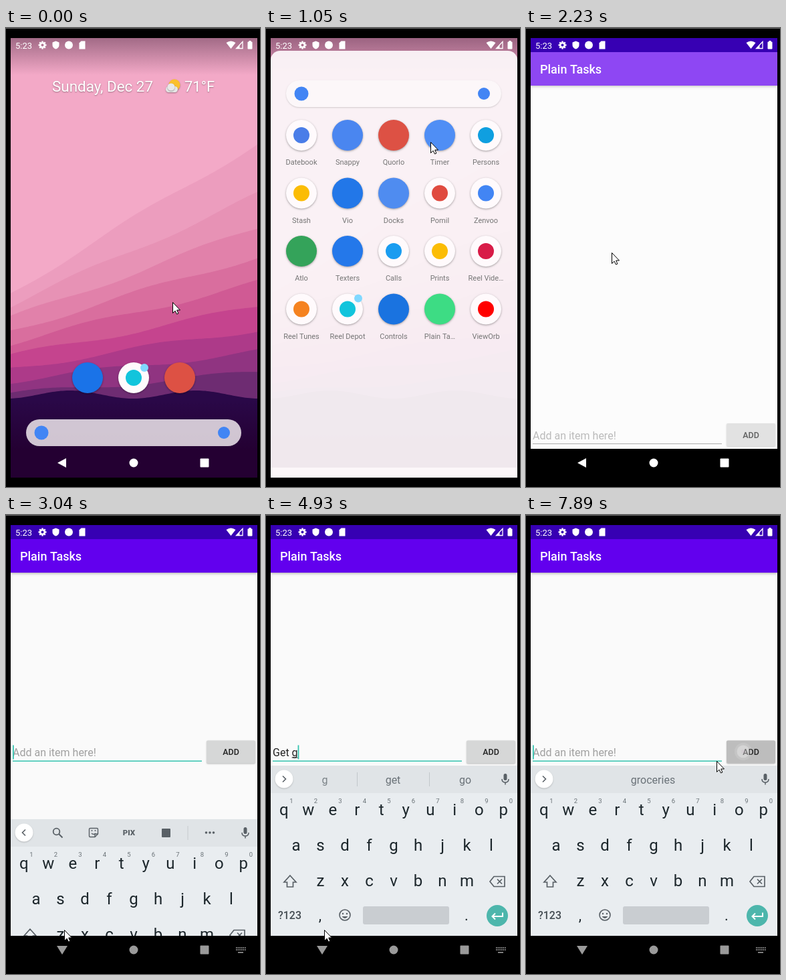
Recreate the animation shown at these times as an HTML page with a canvas. Size 380 px wide and 685 px high, loop 8 s.

```html
<!DOCTYPE html>
<html lang="en">
<head>
<meta charset="utf-8">
<style>
html, body { margin: 0; width: 100%; height: 100%; overflow: hidden; background: #000; }
canvas { display: block; width: 380px; height: 685px; }
</style>
</head>
<body>
<canvas id="stage"></canvas>
<script>
const LOOP = 8000, TICK = 130;           // the screen refreshes once per tick
const FONT = 'Roboto, sans-serif', PANEL = '#fcf7f9';
const LAUNCH = 2080, FOCUS = 2730, KEYBOARD = 2860;
const PHRASE = 'Get groceries', TYPE_START = 4130, TYPE_STEP = 200, PRESS = 7650, CLEAR = 7770;
const TYPE_END = TYPE_START + TYPE_STEP * (PHRASE.length - 1);

const canvas = document.getElementById('stage');
const c = canvas.getContext('2d');
const ratio = window.devicePixelRatio || 1;
canvas.width = 380 * ratio;
canvas.height = 685 * ratio;

// time, x, y
const pointerStops = [[130, 249, 409], [650, 269, 451], [780, 260, 301], [1040, 246, 170], [1560, 246, 190],
  [1950, 260, 400], [2210, 128, 335], [2600, 87, 568], [2730, 87, 619], [6890, 87, 619],
  [7410, 284, 380], [7600, 320, 355], [7800, 285, 367]];
const taps = [[780, 259, 336], [1950, 262, 404], [2730, 91, 605], [7670, 325, 353]];

const blue = '#4285f4', red = '#e04a3f', yellow = '#fbbc05';
// name, colour, sits on a white plate
const apps = [
  ['Datebook', '#4a7de8', 1], ['Snappy', '#4a86f0'], ['Quorlo', '#dd5144'], ['Timer', '#4f8ef5'], ['Persons', '#0f9fe0', 1],
  ['Stash', yellow, 1], ['Vio', '#2277e8'], ['Docks', '#4f8cf0'], ['Pomil', red, 1], ['Zenvoo', blue, 1],
  ['Atlo', '#34a35a'], ['Texters', '#2478ea'], ['Calls', '#1a9cf0', 1], ['Prints', yellow, 1], ['Reel Vide…', '#d81b47', 1],
  ['Reel Tunes', '#f58220', 1], ['Reel Depot', '#12c4dc', 1], ['Controls', '#1a73e0'], ['Plain Ta…', '#3ddc84'], ['ViewOrb', '#ff0000', 1]];

const clamp = u => Math.max(0, Math.min(1, u));
const mix = (a, b, u) => a + (b - a) * u;

function track(t, stops) {
  const next = stops.findIndex(stop => stop[0] > t);
  if (next < 0) return stops.at(-1).slice(1);
  if (next === 0) return stops[0].slice(1);
  const a = stops[next - 1], b = stops[next], u = (t - a[0]) / (b[0] - a[0]);
  return a.slice(1).map((v, i) => mix(v, b[i + 1], u));
}

function box(x, y, w, h, color, r = 0) {
  c.fillStyle = color;
  c.beginPath();
  c.roundRect(x, y, w, h, r);
  c.fill();
}
function disc(x, y, r, color) {
  c.fillStyle = color;
  c.beginPath();
  c.arc(x, y, r, 0, 7);
  c.fill();
}
function ring(x, y, r, color, width = 1.5) {
  c.strokeStyle = color;
  c.lineWidth = width;
  c.beginPath();
  c.arc(x, y, r, 0, 7);
  c.stroke();
}
function shape(x, y, d, fill, stroke, width = 1.6) {
  const path = new Path2D(d);
  c.save();
  c.translate(x, y);
  if (fill) { c.fillStyle = fill; c.fill(path); }
  if (stroke) { c.strokeStyle = stroke; c.lineWidth = width; c.stroke(path); }
  c.restore();
}
function text(s, x, y, size, color, align = 'left', weight = 400) {
  c.font = `${weight} ${size}px ${FONT}`;
  c.textAlign = align;
  c.fillStyle = color;
  c.fillText(s, x, y);
}
function faded(alpha, draw) {
  if (alpha <= 0) return;
  c.save();
  c.globalAlpha *= alpha;
  draw();
  c.restore();
}
function clipped(x, y, w, h, draw, r = 0) {
  c.save();
  c.beginPath();
  c.roundRect(x, y, w, h, r);
  c.clip();
  draw();
  c.restore();
}
function shadow(draw, blur = 3, dy = 1, alpha = .35) {
  c.save();
  c.shadowColor = `rgba(0,0,0,${alpha})`;
  c.shadowBlur = blur * ratio;
  c.shadowOffsetY = dy * ratio;
  draw();
  c.restore();
}
function fadeBox(top, bottom, from, to) {
  const fill = c.createLinearGradient(0, top, 0, bottom);
  fill.addColorStop(0, from);
  fill.addColorStop(1, to);
  box(7, top, 369, 671 - top, fill);
}
function terrain(color, heightAt) {
  c.fillStyle = color;
  c.beginPath();
  c.moveTo(7, 671);
  for (let x = 7; x <= 376; x += 3) c.lineTo(x, heightAt(x));
  c.lineTo(376, 671);
  c.fill();
}

function wallpaper() {
  box(7, 15, 369, 656, '#f3a9c7');
  const bands = 8;
  for (let i = 0; i <= bands; i++) {
    const u = i / bands, left = mix(395, 546, u), right = mix(172, 514, u ** .72);
    terrain(`hsl(${335 - 38 * u ** 3} ${mix(67, 44, u)}% ${77 - 46 * u ** 1.3}%)`,
      x => mix(left, right, (x - 7) / 369) + 4 * Math.sin(x / 42 + i * 2));
  }
  terrain('#2a0848', x => 547 + 6 * Math.cos((x - 190) / 30));
  fadeBox(555, 630, 'rgba(36,0,50,0)', '#240032');
  fadeBox(15, 70, 'rgba(50,20,45,.42)', 'rgba(50,20,45,0)');
}

function appIcon(x, y, color, plate) {
  shadow(() => disc(x, y, 23, plate ? '#fffafc' : color));
  if (plate) disc(x, y, 12, color);
}

function home(lift) {
  const up = lift * 13;
  faded(1 - lift * .4, () => shadow(() => {
    text('Sunday, Dec 27', 69, 95 - up, 22.4, '#fff');
    text('71°F', 267, 95 - up, 22, '#fff');
    disc(252, 85 - up, 8.5, '#fbc02d');
    box(239, 87 - up, 18, 9, '#e8e8e8', 4.5);
    disc(247, 88 - up, 5.5, '#e8e8e8');
  }, 2));
  faded(1 - lift * .45, () => {
    appIcon(122, 522 - up, '#1a73e8');
    appIcon(191, 522 - up, '#12c4dc', 1);
    appIcon(260, 522 - up, '#dd5144');
    disc(207, 507 - up, 6, '#80d8ff');
  });
}

function drawer(searchY, lift) {
  const open = clamp((540 - searchY) / 442);
  const top = searchY - mix(51, 64, open);
  faded(lift * mix(.4, .94, open), () => box(7, top, 369, 671 - top, PANEL, [14, 14, 0, 0]));
  if (open === 1) box(7, 656, 369, 15, PANEL);
  const pill = () => box(30, searchY - 20, 322, 40, PANEL, 20);
  if (open > .9) shadow(pill, 2, 1, .16);
  else faded(.8, pill);
  disc(53, searchY, 10.5, blue);
  disc(326, searchY, 9, blue);
  faded(lift * mix(.1, 1, open), () => apps.forEach(([name, color, plate], i) => {
    const x = 53 + i % 5 * 69, y = searchY + 62 + Math.floor(i / 5) * 86.5;
    appIcon(x, y, color, plate);
    if (name === 'Reel Depot') disc(x + 16, y - 16, 6, '#80d8ff');
    text(name, x, y + 44, 11, '#757575', 'center');
  }));
}

function statusBar(color) {
  text('5:23', 14, 30.5, 13, color);
  for (let i = 0; i < 8; i++) {
    c.save();
    c.translate(54.5, 25.5);
    c.rotate(i * Math.PI / 4);
    box(-1.2, -6, 2.4, 2.8, color);
    c.restore();
  }
  ring(54.5, 25.5, 3.3, color, 2.6);
  shape(74.5, 25.5, 'M0-6L5-4V0Q5 4 0 6Q-5 4-5 0V-4Z', color);
  disc(94, 25.5, 6, color);
  shape(114, 25.5, 'M-1.5-6H4.5V6H-4.5V-3Z', color);
  shape(336.5, 25, 'M0 6L-7-3Q0-8 7-3Z', color);
  shape(349.5, 25.5, 'M4.5-5V5H-5Z', null, color, 1.3);
  shape(349.5, 25.5, 'M0 0V5H-5Z', color);
  box(361.5, 20.5, 7, 11, color, 1);
  box(363.5, 19, 3, 2, color);
}

function navBar(color, typing, switcher) {
  shape(84, 649, typing ? 'M-8-6H8L0 7Z' : 'M6-7V7L-7 0Z', color);
  disc(191, 649, 6.5, color);
  box(290.5, 642.5, 13, 13, color, 1);
  if (!switcher) return;
  for (let i = 0; i < 12; i++) box(344 + i % 6 * 2.6, 645 + Math.floor(i / 6) * 3, 1.6, 1.8, color);
  box(347, 652, 8, 1.6, color);
}

function inputRow(now, typed, focused) {
  const teal = '#35c4b0';
  if (typed) text(typed, 10, 613.5, 16, '#222');
  else text('Add an item here!', 10, 613.5, 16, '#a0a0a0');
  c.font = `16px ${FONT}`;
  const wordStart = typed.lastIndexOf(' ') + 1;
  const from = c.measureText(typed.slice(0, wordStart)).width, to = c.measureText(typed).width;
  if (wordStart < typed.length) box(10 + from, 615, to - from, 1, '#222');
  box(10, 620, 283, focused ? 1.6 : 1, focused ? teal : '#8c8c8c');
  const idle = now - (now < TYPE_START ? 3000 : TYPE_END);
  if (focused && (idle < 0 || idle % 1000 < 500)) box(10 + to, 597, 1.8, 21, teal);
  shadow(() => box(300, 590, 73, 34, now >= PRESS ? '#bdbdbd' : '#d6d7d7', 2), 2, 1, .25);
  text('ADD', 336.5, 611.5, 12.5, '#222', 'center', 500);
}

function suggestions(typed) {
  const word = typed.split(' ').pop();
  if (word === 'groceries' || !typed) return ['', 'groceries', ''];
  if (!word) return ['it', 'the', 'to'];
  if (word[0] === 'G') return [word, 'Get', word === 'Get' ? '' : 'Go'];
  if (word === 'g') return [word, 'get', 'go'];
  return [word, 'groceries', word.length < 7 ? 'gross' : ''];
}

function toolIcons(gray) {
  ring(75.5, 392.5, 4.8, gray, 1.8);
  shape(79, 396, 'M0 0L5.5 5.5', null, gray, 2);
  shape(131, 394, 'M-5-6.5H5Q6.5-6.5 6.5-5V2L2 6.5H-5Q-6.5 6.5-6.5 5V-5Q-6.5-6.5-5-6.5ZM6 2H2V6M-3 1Q0 4 3 1', null, gray, 1.4);
  for (const x of [128.5, 133.5]) disc(x, 391, 1, gray);
  text('PIX', 184, 398, 11.5, gray, 'center', 900);
  box(233, 388, 13, 13, gray, 1);
  box(271.5, 384, 1, 21, '#c5cace');
  for (const x of [299.5, 305, 310.5]) disc(x, 394, 1.8, gray);
}

function keyboard(now, typed) {
  const dark = '#1c262b', gray = '#596066';
  box(7, 374, 369, 254, '#e9edf0');
  box(7, 374, 369, 41, '#e0e4e7');
  shadow(() => disc(27, 394, 13.5, '#fff'), 2, 1, .2);
  const tools = now < TYPE_START;
  shape(27, 394, tools ? 'M2-4.5L-2.5 0L2 4.5' : 'M-2-4.5L2.5 0L-2 4.5', null, gray);
  if (tools) {
    toolIcons(gray);
  } else {
    const [left, middle, right] = suggestions(typed);
    const sure = left.startsWith('gr');
    text(left, 88, 400.5, 16, '#7b8388', 'center');
    text(middle, 190, 400.5, 16, sure ? '#000' : '#6a7278', 'center', sure ? 700 : 400);
    text(right, 298, 400.5, 16, '#6a7278', 'center');
    if (left) for (const x of [136, 244]) box(x, 384, 1, 21, '#c2c7cb');
  }
  box(355.5, 386, 5, 10, gray, 2.5);
  shape(358, 394, 'M-5 0Q-5 5 0 5Q5 5 5 0M0 5V8.5', null, gray, 1.5);

  ['qwertyuiop', 'asdfghjkl', 'zxcvbnm'].forEach((letters, row) =>
    [...letters].forEach((letter, i) =>
      text(letter, 191 + (i - (letters.length - 1) / 2) * 36.5, 448 + row * 53, 24, dark, 'center')));
  for (let i = 0; i < 10; i++) text((i + 1) % 10, 38 + i * 36.5, 430, 9.5, '#697176', 'center');
  shape(36, 547, 'M0-9L9 1H4.5V8H-4.5V1H-9Z', null, gray, 1.7);
  shape(346, 547, 'M-5-7.5H11V7.5H-5L-11 0ZM0-3.5L7 3.5M7-3.5L0 3.5', null, gray, 1.7);
  text('?123', 35.5, 603, 16, '#444c52', 'center', 500);
  text(',', 81, 605, 22, dark, 'center');
  text('.', 300, 605, 22, dark, 'center');
  ring(118, 597, 8, gray, 1.6);
  for (const x of [115, 121]) disc(x, 595, 1.2, gray);
  shape(118, 598, 'M-4.5 1Q0 7 4.5 1Z', gray);
  box(145, 584, 129, 27, '#c9cdd1', 3);
  disc(346, 598, 16, '#4db6ac');
  shape(346, 598, 'M8-4.5V1H-7M-3-3.5L-7.5 1L-3 5.5', null, '#fff', 2);
}

function todoApp(now, t) {
  const count = Math.floor((now - TYPE_START) / TYPE_STEP) + 1;
  const typed = now < CLEAR ? PHRASE.slice(0, Math.max(0, count)) : '';
  const open = clamp(.6 + .4 * (t - LAUNCH) / TICK);
  const veil = clamp((2600 - t) / 390) * .28;
  const raised = t >= KEYBOARD;
  clipped(mix(237, 7, open), mix(377, 15, open), mix(46, 369, open), mix(46, 656, open), () => {
    box(7, 15, 369, 656, '#000');
    box(7, 36, 369, 592, '#fafafa');
    shadow(() => box(7, 36, 369, 50, '#6200ee'), 4, 1);
    text('Plain Tasks', 21, 68, 18, '#fff', 'left', 500);
    c.save();
    c.translate(0, raised ? -253.5 : 0);
    inputRow(now, typed, t >= FOCUS);
    c.restore();
    box(7, 36, 369, 592, `rgba(255,255,255,${veil})`);
    box(7, 15, 369, 21, '#3700b3');
    if (raised) clipped(7, 370, 369, 258, () => {
      c.translate(0, 180 * (1 - clamp((t - KEYBOARD) / 390)) ** 2);
      keyboard(now, typed);
    });
    navBar(t >= FOCUS ? '#9a9a9a' : '#fff', t >= FOCUS, raised);
  }, 20 * (1 - open));
  statusBar('#fff');
}

function launcher(t) {
  const [searchY] = track(t, [[650, 604], [780, 540], [910, 190], [1040, 98], [1300, 79]]);
  const lift = clamp((604 - searchY) / 64);
  wallpaper();
  box(7, 15, 369, 656, `rgba(110,50,90,${.12 * lift})`);
  if (searchY > 300) home(lift);
  clipped(7, 15, 369, 656, () => drawer(searchY, lift));
  const shade = mix(255, 110, clamp((t - 1430) / 390));
  const tint = `rgb(${shade},${shade},${shade})`;
  statusBar(tint);
  if (t < 1040 || shade < 255) navBar(tint);
}

function touchMark(x, y) {
  disc(x, y, 13, 'rgba(255,255,255,.25)');
  disc(x, y, 9.5, 'rgba(255,255,255,.55)');
  disc(x, y, 3, 'rgba(200,170,190,.35)');
}

function render(now) {
  const t = Math.floor(now / TICK) * TICK;
  c.setTransform(ratio, 0, 0, ratio, 0, 0);
  box(0, 0, 380, 685, '#000');
  box(0, 0, 380, 1, '#666');
  if (t < LAUNCH + TICK) launcher(t);
  if (t >= LAUNCH) todoApp(now, t);
  for (const [start, x, y] of taps) {
    if (t >= start && t < start + TICK) touchMark(x, y);
    else if (t > PRESS && start > PRESS) faded(.5, () => touchMark(x, y));
  }
  const [x, y] = track(t, pointerStops);
  shape(Math.round(x) + .5, Math.round(y) + .5, 'M0 0V16L3.6 12.6L6 17.5L8.4 16.5L6.2 11.5H11Z', '#fff', '#000', 1);
}

const started = performance.now();
function loop() {
  render((performance.now() - started) % LOOP);
  requestAnimationFrame(loop);
}
loop();
</script>
</body>
</html>
```
